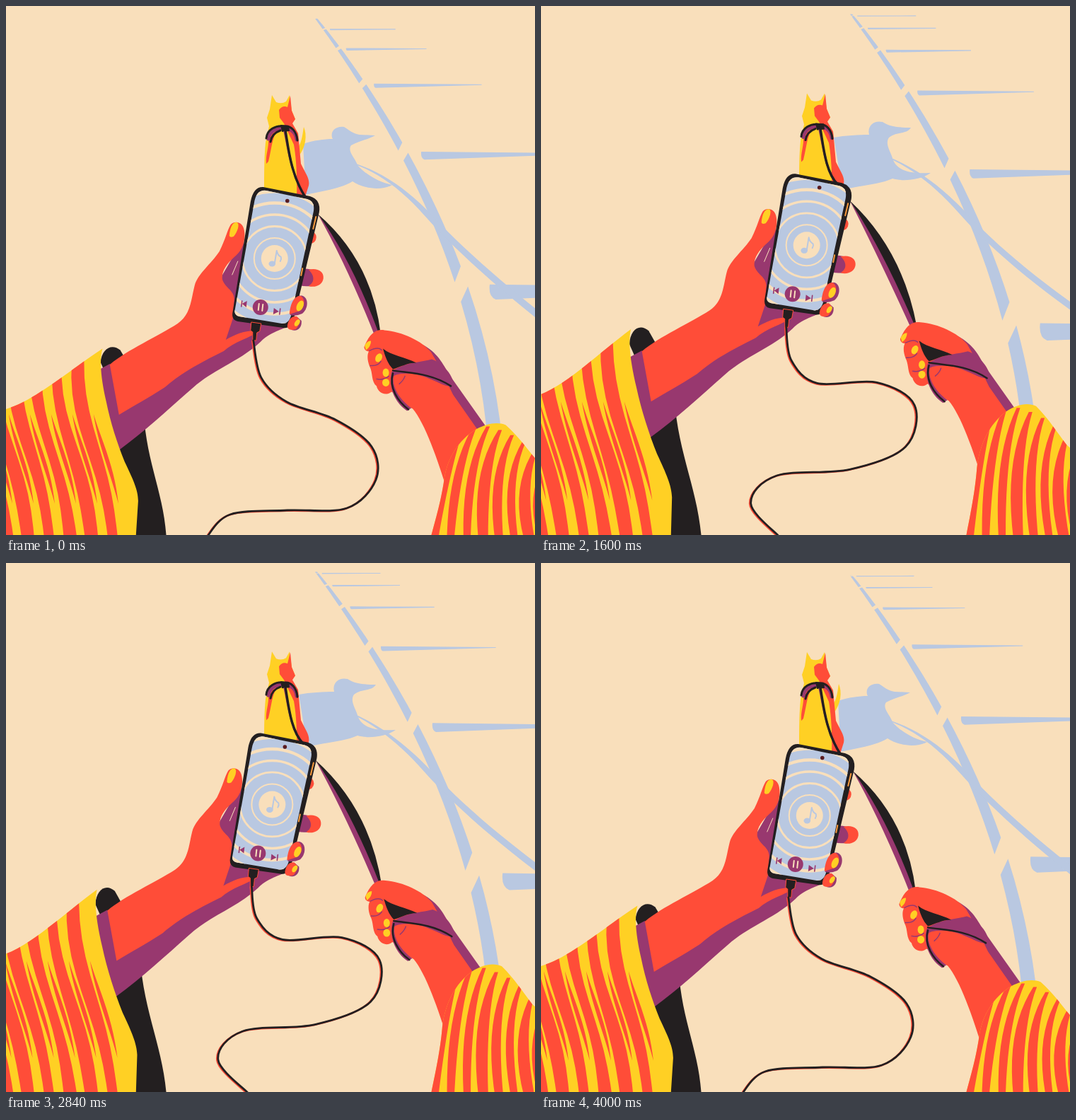
An HTML page that plays this animation: 748x748 px, repeating every 4040 ms.

```html
<!DOCTYPE html>
<html lang="en">
<head>
<meta charset="utf-8">
<title>Music walk</title>
<style>
  html, body { margin: 0; width: 100%; height: 100%; overflow: hidden; background: #f9dfbb; }
  svg { display: block; width: 748px; height: 748px; }
  .r { fill: #ff4d38; }
  .y { fill: #ffd024; }
  .p { fill: #98386f; }
  .k { fill: #231f20; }
  .b { fill: #b9c8e1; }
  .c { fill: #f9dfbb; }
  .line { fill: none; stroke-linecap: round; stroke-linejoin: round; }
  .kl { stroke: #231f20; }
  .pl { stroke: #98386f; }
  .rl { stroke: #ff4d38; }
  .bl { stroke: #b9c8e1; }
  .cl { stroke: #f9dfbb; }
  .ol { stroke: #f79a3c; }
</style>
</head>
<body>
<svg viewBox="0 0 748 748">
  <defs>
    <clipPath id="screen"><path d="M368,262 L426,274 Q438,277 435,292 L404,436 Q401,451 390,450 L330,440 Q322,438 324,430 L351,280 Q354,260 368,262Z"/></clipPath>
    <clipPath id="cuffL"><path id="cuffLShape" d="M-20,578 L0,571 C40,560 92,515 137,486 C132,502 135,530 142,560 C148,590 158,620 168,645 C180,670 187,685 187,700 L183,760 L-20,760Z"/></clipPath>
    <clipPath id="cuffR"><path id="cuffRShape" d="M598,760 C612,712 617,690 620,668 C625,640 640,615 665,600 C680,592 695,589 707,594 C725,610 735,625 748,640 L775,662 L775,760Z"/></clipPath>
  </defs>

  <path id="fence" class="b"/>
  <path id="leashShadow" class="b"/>
  <path id="shadowUp" class="b" d="M420,195 C435,190 450,188 462,188 C457,178 466,169 478,171 C486,176 490,180 500,182 L522,183 C512,189 500,190 488,197 C482,205 494,215 497,225 C510,240 530,250 546,253 C530,262 505,258 490,248 C475,258 445,262 424,267Z"/>
  <path id="shadowDown" class="b" d="M414,186 C430,183 450,182 464,182 C461,170 470,161 483,164 C492,170 503,172 523,172 C517,182 503,177 492,186 C486,195 494,205 497,215 C502,232 520,238 551,236 C535,247 510,248 497,244 C480,252 450,254 426,260Z"/>

  <g id="dog">
    <path id="tail" class="y" d="M409,207 C418,198 419,186 421,173 C426,184 424,202 414,214Z"/>
    <path class="y" d="M376,128 L382,138 Q390,141 396,137 L401,128 L404,150 L409,162 L404,168 L413,182 L417,240 L424,275 L365,275 C365,240 365,215 367,195 L372,172 L369,160 L373,148Z"/>
    <path class="r" d="M402,129 L404,150 L409,162 L405,168 L413,182 L417,225 C424,240 430,246 428,256 L422,275 L411,275 C412,240 410,215 407,198 L393,168 L387,160 L386,149 Q391,142 398,145Z"/>
    <path class="r" d="M371,188 C375,184 380,179 384,178 C376,188 376,202 371,222 L368,225 C367,210 372,204 371,188Z"/>
    <path class="line pl" stroke-width="5" d="M371,190 C372,180 381,174 394,175 C404,175 410,182 411,191"/>
    <path class="line kl" stroke-width="3" d="M368,189 C369,177 381,170 394,172 C404,171 411,180 412,192 M374,194 Q376,182 388,178"/>
    <path class="k" d="M388,170 L400,171 L401,179 L390,180Z"/>
  </g>
  <path id="backPurple" class="line pl" stroke-width="3"/>
  <path id="backLeash" class="line kl" stroke-width="3.4"/>
  <path id="leashPurple" class="p"/>
  <path id="leash" class="k"/>

  <g id="cuffLBack" class="k">
    <path d="M134,505 C136,486 150,478 162,488 L172,505 L150,540Z"/>
    <path d="M150,600 L195,560 C194,640 226,690 227,760 L170,760Z"/>
  </g>

  <g id="hand">
    <path class="r" d="M436,321 Q442,328 436,335 L430,338Z"/>
    <path class="p" d="M418,372 C434,373 450,376 448,388 C444,399 430,398 412,396Z"/>
    <path class="r" d="M428,374 C440,371 450,376 449,386 C448,395 438,400 428,397 C438,391 436,381 428,374Z"/>
    <path class="p" d="M95,535 L147,507 L165,560 L305,430 L304,385 L336,330 L345,440 L405,448 C395,460 378,458 360,476 C332,502 302,511 270,536 C240,562 200,600 160,629 L120,660Z"/>
    <path class="r" d="M147,508 C172,487 215,468 243,450 C262,437 262,415 267,396 C272,379 290,366 302,348 C311,330 313,318 318,310 C324,304 335,306 337,318 C340,335 333,348 323,356 C312,366 305,376 306,387 C309,399 322,402 323,415 L321,443 L311,473 C326,464 343,458 359,461 C345,470 322,476 308,489 C280,503 250,518 225,540 C200,556 180,567 160,579Z"/>
    <path class="line cl" stroke-width="1" d="M320,381 L328,362"/>
    <path class="y" d="M316,326 C317,312 322,306 327,307 C331,309 328,320 322,327 Q317,329 316,326Z"/>

    <path class="k" d="M364,257 L430,270 Q446,275 443,293 L408,440 Q404,458 392,456 L328,447 Q318,445 321,432 L346,278 Q350,256 364,257Z"/>
    <g clip-path="url(#screen)">
      <rect class="b" x="315" y="250" width="130" height="210"/>
      <g id="rings" class="line cl"></g>
      <circle class="c" cx="380" cy="358" r="19"/>
      <ellipse class="b" cx="376.500" cy="365.500" rx="4.800" ry="4"/>
      <path class="line bl" stroke-width="2" d="M380,365 L383,347 Q384,353 389,356 Q390,359 388,362"/>
      <circle class="p" cx="360" cy="427" r="11"/>
      <path class="line cl" stroke-width="2" d="M358,422 L357,431 M363.500,423 L362.500,432"/>
      <path class="p" d="M341,418 L340,427 L334,422Z M379,428 L378,437 L386,433Z"/>
      <path class="line pl" stroke-width="1.600" d="M334,418 L333,426 M388,429 L387,437"/>
    </g>
    <circle cx="398" cy="276.500" r="2.800" fill="#5a1c20"/>
    <path class="line ol" stroke-width="2" d="M438.500,299 L434.500,316 M419.500,372 L417.500,382"/>

    <path class="p" d="M402,438 C404,415 412,409 420,411 C429,415 427,430 419,436 Q410,440 402,438Z"/>
    <path class="r" d="M401,437 C402,420 409,410 417,411 C425,416 422,430 413,433Z"/>
    <ellipse class="y" cx="416" cy="425" rx="4.500" ry="8" transform="rotate(25 416 425)"/>
    <path class="p" d="M404,459 C412,462 419,456 418,446 L411,440Z"/>
    <path class="r" d="M398,454 C399,445 404,439 411,440 C417,443 416,452 410,458 Q399,461 398,454Z"/>
    <ellipse class="y" cx="412" cy="449" rx="3.200" ry="5.500" transform="rotate(35 412 449)"/>

    <path class="k" stroke="#ff4d38" stroke-width="1" d="M347,448 L361,450 L359,461 L355,463 L354,474 L349,474 L349,462 L346,460Z"/>
  </g>

  <path id="cordRed" class="line rl" stroke-width="2.600" transform="translate(-1.500 .8)"/>
  <path id="cord" class="line kl" stroke-width="2.800"/>

  <g id="sleeveL">
    <use href="#cuffLShape" class="y"/>
    <g clip-path="url(#cuffL)"><path id="stripesL" class="r"/></g>
  </g>

  <g id="fist">
    <path class="p" d="M572,472 C602,482 614,498 624,518 L682,600 L668,610 L624,545Z"/>
    <path class="r" d="M507,481 C514,465 522,457 535,459 C560,461 588,474 601,490 C613,510 622,530 632,550 L688,630 L670,690 L625,690 C610,640 592,590 575,570 C560,562 550,548 545,546 C535,554 525,545 524,538 C516,532 519,519 514,510 C510,500 511,492 513,489 C508,489 505,484 507,481Z"/>
    <path class="line pl" stroke-width="1.500" d="M514,488 Q526,482 531,487 M515,509 Q526,510 530,503 M524,528 Q534,530 541,524 M556,535 Q562,530 564,524"/>
    <path class="p" d="M545,518 C565,503 585,505 602,500 C620,506 635,528 632,537 C622,543 600,523 572,520 Q552,520 548,524 C545,540 558,558 573,569 L567,573 C550,562 540,540 545,518Z"/>
    <path class="k" d="M533,485 C545,495 565,497 580,505 C566,505 556,512 547,514 C540,507 536,496 533,485Z"/>
    <path class="line kl" stroke-width="2.500" d="M547,516 C570,520 600,519 629,538 M547,520 C541,540 554,560 569,571"/>
    <path class="y" d="M507,481 Q510,474 516,474 Q516,482 509,487Z"/>
    <ellipse class="y" cx="527" cy="498" rx="4.500" ry="6.500" transform="rotate(25 527 498)"/>
    <ellipse class="y" cx="537" cy="519" rx="4.500" ry="6"/>
    <ellipse class="y" cx="537" cy="533" rx="5" ry="5.500"/>
  </g>

  <g id="sleeveR">
    <use href="#cuffRShape" class="y"/>
    <g clip-path="url(#cuffR)"><path id="stripesR" class="r"/></g>
  </g>
</svg>
<script>
const LOOP = 4040, TICK = 40, FPS = 12, STRIDE = 16;
const { PI, sin, cos, exp, sqrt, max, min, floor } = Math;
const $ = id => document.getElementById(id);
const mix = (a, b, t) => a + (b - a) * t;
const blend = (a, b, t) => [mix(a[0], b[0], t), mix(a[1], b[1], t)];
const quad = (a, b, c, t) => blend(blend(a, b, t), blend(b, c, t), t);
const move = (id, x, y) => $(id).setAttribute('transform', `translate(${x} ${y})`);
const draw = (id, d) => $(id).setAttribute('d', d);
const show = (id, on) => { $(id).style.display = on ? '' : 'none'; };

// Closed band around a centre line, both given for t in 0..1
function ribbon(centre, width, steps = 12) {
  const left = [], right = [];
  for (let i = 0; i <= steps; i++) {
    const t = i / steps, [x, y] = centre(t), w = width(t) / 2;
    left.push([x - w, y]);
    right.unshift([x + w, y]);
  }
  return `M${left.join('L')}L${right.join('L')}Z`;
}

// Catmull-Rom curve through points
function smooth(q) {
  let d = `M${q[0]}`;
  for (let i = 0; i < q.length - 1; i++) {
    const a = q[i - 1] || q[i], b = q[i], c = q[i + 1], e = q[i + 2] || c;
    d += `C${b[0] + (c[0] - a[0]) / 6},${b[1] + (c[1] - a[1]) / 6} ` +
         `${c[0] - (e[0] - b[0]) / 6},${c[1] - (e[1] - b[1]) / 6} ${c}`;
  }
  return d;
}

function paintStripes() {
  let d = '';
  for (let k = -2; k < 4; k++) {
    const flow = (x, t) => [x + 30 * k + 48 * t ** 1.5 - 6 * sin(2 * PI * t), 480 + 280 * t];
    d += ribbon(t => flow(14, t), t => 17 + 3 * sin(2 * k + 5 * t));
    d += ribbon(t => flow(29, .35 + .45 * t), t => 6 * sin(PI * t));
  }
  draw('stripesL', d);

  d = '';
  for (let k = 0; k < 10; k++) {
    const top = [648 + 17 * k, 592 + k * k], low = [604 + 24 * k, 760 + 4 * k];
    const bend = [top[0] - 32, top[1] + 60];
    d += ribbon(t => quad(top, bend, low, t), t => 5 + (9 + 3 * cos(2 * k)) * sin(PI * t * .8));
  }
  draw('stripesR', d);
}

// Fence shadow: evenly spaced bars, spacing grows by a fixed ratio towards the viewer
const railX = d => 431 + .74 * d - .00054 * d * d;
const railW = d => 1 + .8 * sqrt(d);
const barX = d => 438 + .86 * d - .0006 * d * d;

function fence(frame, horizon) {
  const RATIO = 1.955, FAR = 8, NEAR = 640;
  const phase = (frame * .0642 - .02) % 1;
  const depth = k => {
    const u = 400 * RATIO ** (k + phase);
    return u - 10 * exp(-u / 25);
  };
  const inside = d => max(FAR, min(NEAR, d));
  let path = '';
  for (let k = -6; k < 2; k++) {
    const d = depth(k), next = depth(k + 1);
    if (next > FAR && d < NEAR) {
      const side = (from, to, edge) => Array.from({ length: 9 }, (_, i) => {
        const e = mix(inside(from), inside(to), i / 8);
        return [railX(e) + edge * railW(e), e + horizon];
      }).join('L');
      path += `M${side(d * 1.035, next * .965, 0)}L${side(next * .908, d * .98, 1)}Z`;
    }
    if (d > FAR + .5 && d < NEAR) {
      const x = barX(d), y = d + horizon, h = d * .052 + .8, end = x + 75 + .75 * d;
      path += `M${x},${y - h / 2} L${end},${y - h / 4 - .5} L${end},${y - h / 4 + .6}` +
              ` L${x + h * .4},${y + h / 2} Q${x - h * .1},${y + h * .3} ${x},${y - h / 2}Z`;
    }
  }
  return path;
}

function leashShadow(start, sag, end) {
  const mid = [597, 290 + sag];
  return ribbon(t => quad(start, [548, 236 + sag], mid, t), t => mix(4, 11, t)) +
         ribbon(t => quad(mid, [655, 354 + sag], end, t), t => mix(11, 16, t));
}

const points = s => s.split(' ').map(p => p.split(',').map(Number));
const OPEN = points('350,474 361,526 397,560 466,585 517,623 523,670 482,710 398,713 317,719 283,752');
const LOOPED = points('351,474 357,517 392,545 475,539 528,572 515,631 435,662 330,669 289,706 322,751');

// The loop sways sideways and flicks open at each footfall
function cordPoints(step, dx, dy) {
  const open = ((1 + cos(step)) / 2) ** 10, sway = sin(step) * (1 - open);
  return LOOPED.map((q, i) => {
    const t = i / (LOOPED.length - 1), hang = max(0, 1 - 3 * t);
    const [x, y] = blend(q, OPEN[i], open);
    return [x + dx * hang + 22 * sway * t ** 6, y + dy * hang - 11 * sway * sin(PI * t)];
  });
}

// Sleeves stretch from the bottom of the stage
function stretch(id, rise, height, lean) {
  const k = 1 - rise / height, s = -rise * lean / height;
  $(id).setAttribute('transform', `matrix(1 0 ${s} ${k} ${-748 * s} ${748 * (1 - k)})`);
}

function strip(from, outer, inner, rise, to, w) {
  const [mx, my] = blend(from, to, .5);
  return `M${from} Q${mx + outer},${my + rise} ${to} L${to[0] - w},${to[1]} Q${mx + inner},${my + rise} ${from}Z`;
}

function pose(frame) {
  const p = frame % STRIDE, walk = 2 * PI * p / STRIDE, step = 2 * walk;
  const jolt = ((1 + cos(step + .31)) / 2) ** 2;
  const dy = -21 + 17.5 * jolt + 3.3 * cos(walk), dx = dy * .22;
  const rise = dy * 1.45;
  const dogY = -6 + 2.5 * cos(step) + 3 * sin(walk) + 1.5 * cos(walk);
  const bulge = 2 * (dogY + 7);
  const tailUp = cos(walk) > .9;

  draw('fence', fence(frame, 10 + dy / 3));
  draw('leashShadow', leashShadow(tailUp ? [493, 223] : [496, 216], dogY + 8, [756, 423 + 17 * cos(walk)]));
  show('tail', tailUp);
  show('shadowUp', tailUp);
  show('shadowDown', !tailUp);
  move('dog', 0, dogY);
  move('hand', dx, dy);
  move('fist', -dy * .08, dy * .6);
  for (const id of ['cuffLBack', 'sleeveL']) stretch(id, rise, 258, .34);
  stretch('sleeveR', rise, 156, .25);

  const back = `C399,${200 + dogY} 402,${240 + dogY} ${424 + dx},${272 + dy}`;
  draw('backLeash', `M395,${178 + dogY} ${back}`);
  draw('backPurple', `M394,${180 + dogY} ${back}`);

  const top = [441 + dx, 295 + dy], end = [530 - dy * .08, 466 + dy * .6];
  draw('leash', strip(top, 22 + bulge, bulge - 6, -20, end, 2));
  draw('leashPurple', strip(top, bulge, bulge - 14, -14, end, 9));

  const cord = smooth(cordPoints(step, dx, dy));
  draw('cord', cord);
  draw('cordRed', cord);
}

for (let i = 0; i < 5; i++)
  $('rings').innerHTML += `<circle cx="380" cy="358" r="${29 + 16.5 * i}" stroke-width="${2 + .8 * i}"/>`;
paintStripes();

let shown = -1;
function tick() {
  const t = floor(performance.now() % LOOP / TICK) * TICK;
  const frame = floor(t * FPS / 1000 + 1e-6);
  if (frame !== shown) pose(shown = frame);
  requestAnimationFrame(tick);
}
tick();
</script>
</body>
</html>
```
